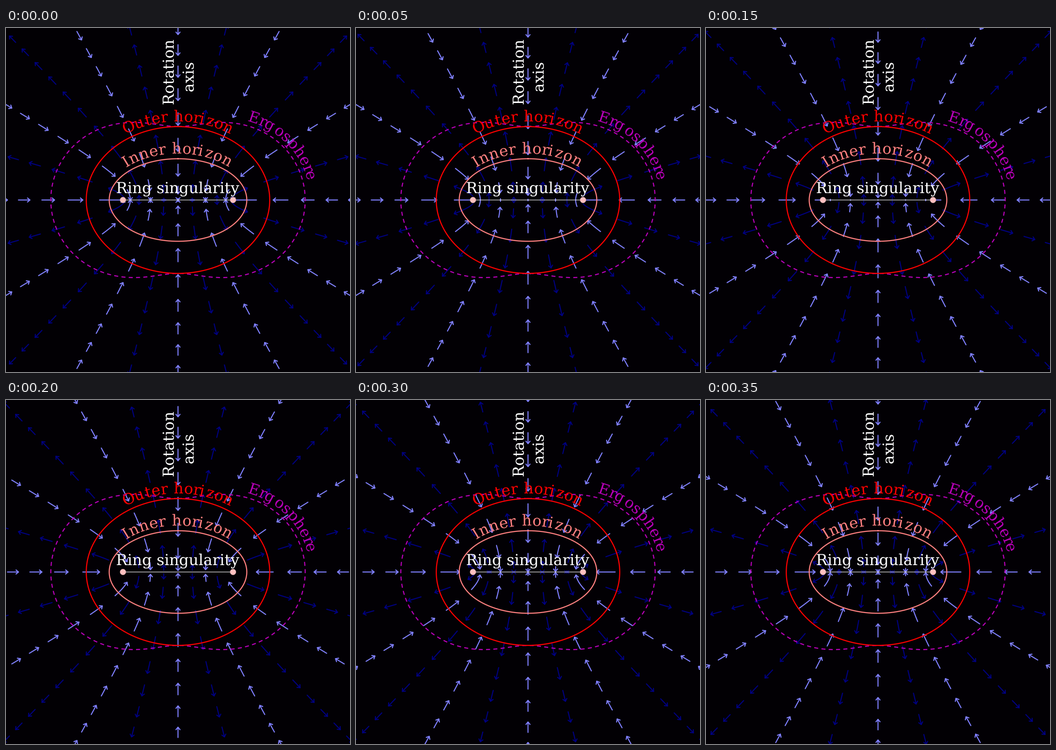
These frames come from a looping animation (725 by 725 pixels, 0.4 s). A matplotlib script:

```python
import numpy as np
import matplotlib.pyplot as plt
from matplotlib.animation import FuncAnimation
from matplotlib.patches import Circle, PathPatch
from matplotlib.textpath import TextPath
from matplotlib.transforms import Affine2D

plt.rcParams["path.snap"] = False

SIDE, DPI = 725, 100
FRAMES, INTERVAL = 8, 50
C = SIDE / 2
M = SIDE / 6                 # black hole mass in pixels
A = 0.96 * M                 # spin parameter, radius of the ring
R_OUT, R_IN = 1.28 * M, 0.72 * M
FLOW = 54                    # light travel per loop, in pixels
EM = 32                      # font size in pixels
FONT = {"family": "DejaVu Serif"}
RED, PINK, PURPLE = "#ff0000", "#ff8080", "#b800b8"


def pt(px):
    return px * 72 / DPI


def point(r, phi):
    """Oblate spheroidal position, phi measured from the rotation axis."""
    return C + np.sqrt(r**2 + A**2) * np.sin(phi), C - r * np.cos(phi)


def outer_r(phi):
    return R_OUT + 0 * phi


def inner_r(phi):
    return R_IN + 0 * phi


def ergo_r(phi):
    return M + np.sqrt(M**2 - (A * np.cos(phi))**2)


fig = plt.figure(figsize=(SIDE / DPI, SIDE / DPI), dpi=DPI, facecolor="#020004")
ax = fig.add_axes([0, 0, 1, 1])
ax.set_xlim(0, SIDE)
ax.set_ylim(SIDE, 0)
ax.axis("off")


# ---- static curves ----
def curve(r, color, **style):
    phi = np.linspace(0, 2 * np.pi, 721)
    ax.plot(*point(r(phi), phi), color=color, lw=pt(2.3), zorder=3, **style)


curve(ergo_r, PURPLE, linestyle=(0, (3.7, 3)), dash_capstyle="butt")
curve(outer_r, RED)
curve(inner_r, PINK)
ax.plot([C - A, C + A], [C, C], color="white", lw=pt(1.1), zorder=4)
for side in (-1, 1):
    ax.add_patch(Circle((C + side * A, C), 6.3, fc="#ffc0c0", lw=0, zorder=5))


# ---- labels ----
def glyphs(text):
    return TextPath((0, 0), text, size=EM, prop=FONT)


def advance(text):
    return glyphs(text + ".").get_extents().x1 - glyphs(".").get_extents().x1


def put(path, dx, x, y, angle, color):
    move = Affine2D().translate(dx, 0).scale(1, -1).rotate(angle).translate(x, y)
    ax.add_patch(PathPatch(move.transform_path(path), fc=color, lw=0, zorder=6))


def label(text, x, y, angle=0):
    path = glyphs(text)
    box = path.get_extents()
    put(path, -(box.x0 + box.x1) / 2, x, y, angle, "white")


def arc_label(text, r, mid, color, gap):
    """Set text along a curve, centred on the angle mid."""
    phi = np.linspace(-1.8, 1.8, 2000)
    x, y = point(r(phi) + 11, phi)
    s = np.r_[0, np.cumsum(np.hypot(np.diff(x), np.diff(y)))]
    turn = np.unwrap(np.arctan2(np.gradient(y), np.gradient(x)))
    total = advance(text) + gap * (len(text) - 1)
    start = np.interp(mid, phi, s) - total / 2
    for i, ch in enumerate(text):
        if ch == " ":
            continue
        w = advance(ch)
        at = start + advance(text[:i]) + gap * i + w / 2
        put(glyphs(ch), -w / 2, np.interp(at, s, x), np.interp(at, s, y),
            np.interp(at, s, turn), color)


label("Ring singularity", C, 348)
label("Rotation", 353.5, 93.2, -np.pi / 2)
label("axis", 395.5, 103.7, -np.pi / 2)
arc_label("Outer horizon", outer_r, 0, RED, 0.4)
arc_label("Inner horizon", inner_r, -0.005, PINK, 0.7)
arc_label("Ergosphere", ergo_r, np.radians(59.7), PURPLE, 0.3)


# ---- flowing arrows ----
W = np.linspace(0, 28, 6000)     # square root of r


def fall_time(phi):
    """Time, in loops, for free fall from r = W**2 to r = 0."""
    rate = 2 * (W**4 + (A * np.cos(phi))**2) / np.sqrt(W**4 + A**2)
    rate /= FLOW * np.sqrt(2 * M)
    return np.r_[0, np.cumsum((rate[1:] + rate[:-1]) / 2 * np.diff(W))]


def rays(first):
    angles = np.radians(np.arange(first, 360, 30))
    return [(phi, fall_time(phi)) for phi in angles]


def arrow(phi, times, tail, tip):
    """Shaft along the ray, then an open head; parts end with NaN."""
    u = np.linspace(max(tail, 0), max(tip, 0), 14)
    r = np.interp(u, times, W)**2
    x, y = point(r, phi)
    parts = [np.c_[x, y], [[np.nan, np.nan]]]
    if tip >= 0:
        d = np.array([r[-1] / np.hypot(r[-1], A) * np.sin(phi), -np.cos(phi)])
        d *= np.sign(tip - tail) / np.hypot(*d)
        n = np.array([-d[1], d[0]])
        end = np.array([x[-1], y[-1]])
        back = end - 5 * d
        parts += [[back + 4.3 * n, end, back - 4.3 * n], [[np.nan, np.nan]]]
    return np.vstack(parts)


def stream(color):
    return ax.plot([], [], color=color, lw=pt(2.2), zorder=2,
                   solid_capstyle="round", solid_joinstyle="round")[0]


outward, inward = stream("#000080"), stream("#8080ff")
out_rays, in_rays = rays(15), rays(0)


def draw(i):
    t = i / FRAMES
    falling, rising = [], []
    for n in range(13):
        if n - t + 0.5 > 0:
            falling += [arrow(*ray, n - t + 0.5, n - t) for ray in in_rays]
        tip = n + t - 0.5
        if tip > 0:
            rising += [arrow(*ray, tip - 0.5, tip) for ray in out_rays]
    inward.set_data(*np.vstack(falling).T)
    outward.set_data(*np.vstack(rising).T)
    return outward, inward


anim = FuncAnimation(fig, draw, frames=FRAMES, interval=INTERVAL,
                     repeat=True, repeat_delay=0, blit=False)
plt.show()
```
